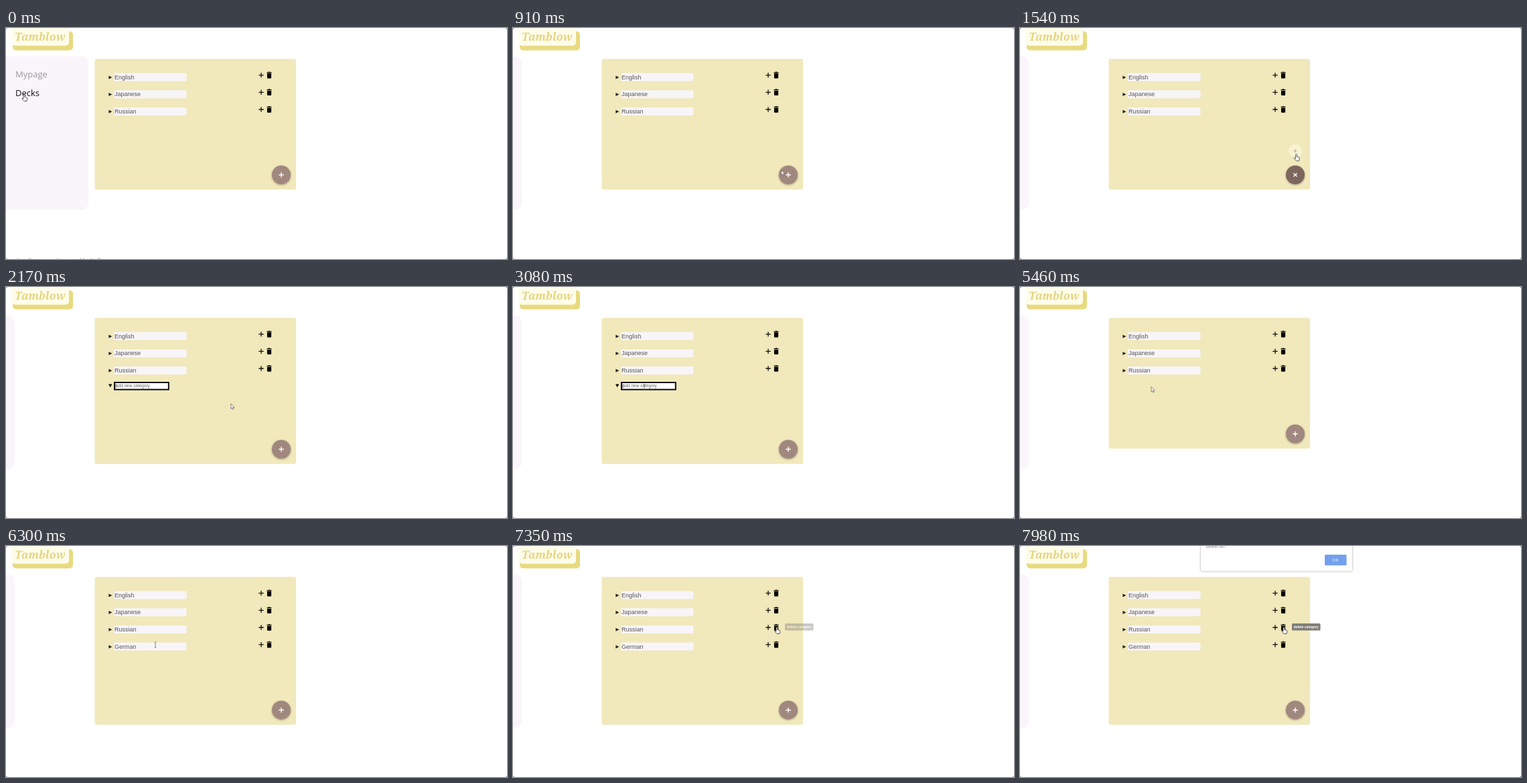
Animation of 748x346 px, one loop 8 s. Source, as an HTML page:

```html
<!DOCTYPE html>
<html lang="en">
<head>
<meta charset="utf-8">
<title>Decks</title>
<style>
  html, body { margin: 0; width: 100%; height: 100%; overflow: hidden; background: #777; }
  svg { display: block; width: 748px; height: 346px; font-family: "Liberation Sans", Arial, sans-serif; }
  .nav { font: 13px "Open Sans", sans-serif; }
  .brand { font: italic bold 16px "Noto Serif", serif; fill: #e5d480; }
  .row { font-size: 9px; fill: #555; }
  .small { font-size: 6.45px; }
  .fab { filter: drop-shadow(0 1.5px 1.5px #0005); }
  #dialog rect:first-child { filter: drop-shadow(0 .5px 1.5px #0006); }
</style>
</head>
<body>
<svg viewBox="0 0 748 346">
  <defs>
    <path id="plus" d="M-3.7 0H3.7M0-3.7V3.7"/>
    <g id="bin">
      <path d="M-3.6-4.3H-1.6L-1-5H1L1.6-4.3H3.6V-3.2H-3.6ZM-3.1-2.5H3.1V3.8Q3.1 4.8 2.1 4.8H-2.1Q-3.1 4.8-3.1 3.8Z"/>
    </g>
  </defs>
  <rect width="748" height="346" rx="3" fill="#fff"/>
  <rect x="10" y="5" width="90" height="28.5" rx="5" fill="#e8da80"/>
  <rect x="8" y="-10" width="86" height="36.5" rx="5" fill="#fefdeb"/>
  <text class="brand" x="13" y="19">Tamblow</text>

  <g id="side" class="nav">
    <rect x="-20" y="42.5" width="143" height="230" rx="10" fill="#f9f5fb"/>
    <text x="14" y="74" fill="#999">Mypage</text>
    <text x="14" y="101.5" fill="#111">Decks</text>
  </g>
  <text id="status" x="17" y="351.5" font-size="9" fill="#555">localhost:3000/mypage/decks/list</text>

  <rect id="panel" x="132.5" y="46.3" width="300.5" rx="3" fill="#f1e8bb"/>
  <g id="rows"></g>

  <g id="entry">
    <path d="M153 145.5H158.4L155.7 150.3Z"/>
    <rect x="162" y="143" width="80.8" height="10.6" fill="#fff" stroke="#0a0a12" stroke-width="2"/>
    <text id="typed" class="small" x="164" y="150.4"></text>
    <path id="caret" d="M0 145V151.6" stroke="#333" stroke-width=".7"/>
  </g>

  <g id="action" transform="translate(411 184)" opacity="0">
    <circle r="10" fill="#fffbe8" opacity=".5"/>
    <use href="#plus" transform="scale(.7)" stroke="#a9a28c" stroke-width="1.3"/>
  </g>
  <g id="fab" class="fab">
    <circle id="disc" r="14"/>
    <use id="cross" href="#plus" stroke="#fff" stroke-width="1.4"/>
  </g>

  <g id="tip">
    <rect x="406" y="116" width="42.5" height="10.6" rx="1.5" fill="#7f7d76"/>
    <text x="427.2" y="123" font-size="5" font-weight="bold" fill="#fff" text-anchor="middle">delete category</text>
  </g>
  <g id="dialog">
    <rect x="270" y="-8" width="226" height="45.5" rx="1.5" fill="#fff"/>
    <text class="small" x="278" y="2.8" fill="#888">delete ok?</text>
    <rect x="455" y="13" width="32.5" height="16" rx="1.5" fill="#73a0ec"/>
    <text x="471.2" y="23.2" font-size="6" fill="#fff" text-anchor="middle">OK</text>
  </g>

  <g id="cursor" stroke-linejoin="round">
    <path id="hand" d="M-1 1Q0-.6 1 1V4.5L4 5.2Q5 5.5 4.8 7L4 10.5H0L-3 7Q-3.5 5.5-2 6L-1 6.8Z" fill="#fff" stroke="#333" stroke-width=".8"/>
    <path id="arrow" d="M0 0V7.5L1.7 6L3 8.6L4.1 8L2.9 5.5H5.2Z" fill="#fff" stroke="#555" stroke-width=".7"/>
    <path id="beam" d="M-1.3-4H1.3M0-4V4M-1.3 4H1.3" fill="none" stroke="#666" stroke-width=".8"/>
  </g>
</svg>
<script>
const LOOP = 8000;
const $ = id => document.getElementById(id);
const set = (id, name, value) => $(id).setAttribute(name, value);
const show = (id, on) => set(id, 'visibility', on ? 'visible' : 'hidden');
const ramp = (t, a, b) => Math.min(1, Math.max(0, (t - a) / (b - a)));
const smooth = k => k * k * (3 - 2 * k);
const mix = (a, b, k) => a + (b - a) * k;

$('rows').innerHTML = ['English', 'Japanese', 'Russian', 'German'].map((name, i) => `
  <g class="row" id="row${i}" transform="translate(0 ${i * 25.7})">
    <path d="M153.4 71.4L158.4 73.9L153.4 76.4Z" fill="#222"/>
    <rect x="161" y="67.5" width="108.5" height="12" rx="2" fill="#f8f5f8"/>
    <text x="162" y="76.5">${name}</text>
    <use href="#plus" x="381" y="70.6" stroke="#111" stroke-width="1.3"/>
    <use href="#bin" x="393" y="70.6" fill="#000"/>
  </g>`).join('');

// Pointer stops: time, x, y
const path = [
  [0, 27, 99], [280, 27, 99], [980, 411, 216], [1190, 411, 216], [1470, 412.5, 188.5],
  [1890, 412.5, 188.5], [2590, 196, 150], [5180, 196, 149.5], [5810, 196, 149.5],
  [5880, 223, 148], [6300, 223, 148], [6440, 338, 96], [6580, 345, 97], [6720, 414, 98],
  [6860, 412, 103], [7140, 394, 121], [LOOP, 394, 121]
];
// Pointer shape from each time on
const shapes = [
  [0, 'hand'], [330, 'arrow'], [940, 'hand'], [1920, 'arrow'], [2450, 'beam'],
  [5320, 'arrow'], [5530, 'beam'], [6350, 'arrow'], [7080, 'hand']
];
const keys = [4060, 4200, 4340, 4480, 4690, 4830];

function pointer(t) {
  const i = path.findIndex(p => p[0] > t);
  const [t0, x0, y0] = path[i - 1], [t1, x1, y1] = path[i];
  const k = smooth(ramp(t, t0, t1));
  set('cursor', 'transform', `translate(${mix(x0, x1, k)} ${mix(y0, y1, k)})`);
  const shape = shapes.findLast(s => s[0] <= t)[1];
  for (const id of ['hand', 'arrow', 'beam']) show(id, id === shape);
}

function draw(t) {
  const editing = t >= 1960 && t < 5320, added = t >= 5530;
  const grow = editing ? 23 : added ? 25.7 : 0;

  set('side', 'transform', `translate(${-110 * smooth(ramp(t, 490, 840))})`);
  show('status', t < 420);
  set('panel', 'height', 195.7 + grow);
  show('row3', added);

  const open = smooth(ramp(t, 1050, 1200)) - smooth(ramp(t, 1820, 1960));
  set('fab', 'transform', `translate(411 ${220 + grow})`);
  set('disc', 'fill', `rgb(${mix(161, 125, open)},${mix(136, 102, open)},${mix(127, 94, open)})`);
  set('cross', 'transform', `rotate(${45 * open})`);
  set('action', 'opacity', open);

  show('entry', editing);
  const count = keys.filter(k => k <= t).length;
  $('typed').textContent = count ? 'German'.slice(0, count) : 'add new category';
  set('typed', 'fill', count ? '#444' : '#666');
  const end = count ? $('typed').getComputedTextLength() : 0;
  set('caret', 'transform', `translate(${164 + end})`);

  set('tip', 'opacity', ramp(t, 7260, 7480));
  show('dialog', t >= 7840);
  pointer(t);
}

const start = performance.now();
function frame() {
  draw((performance.now() - start) % LOOP);
  requestAnimationFrame(frame);
}
frame();
</script>
</body>
</html>
```
